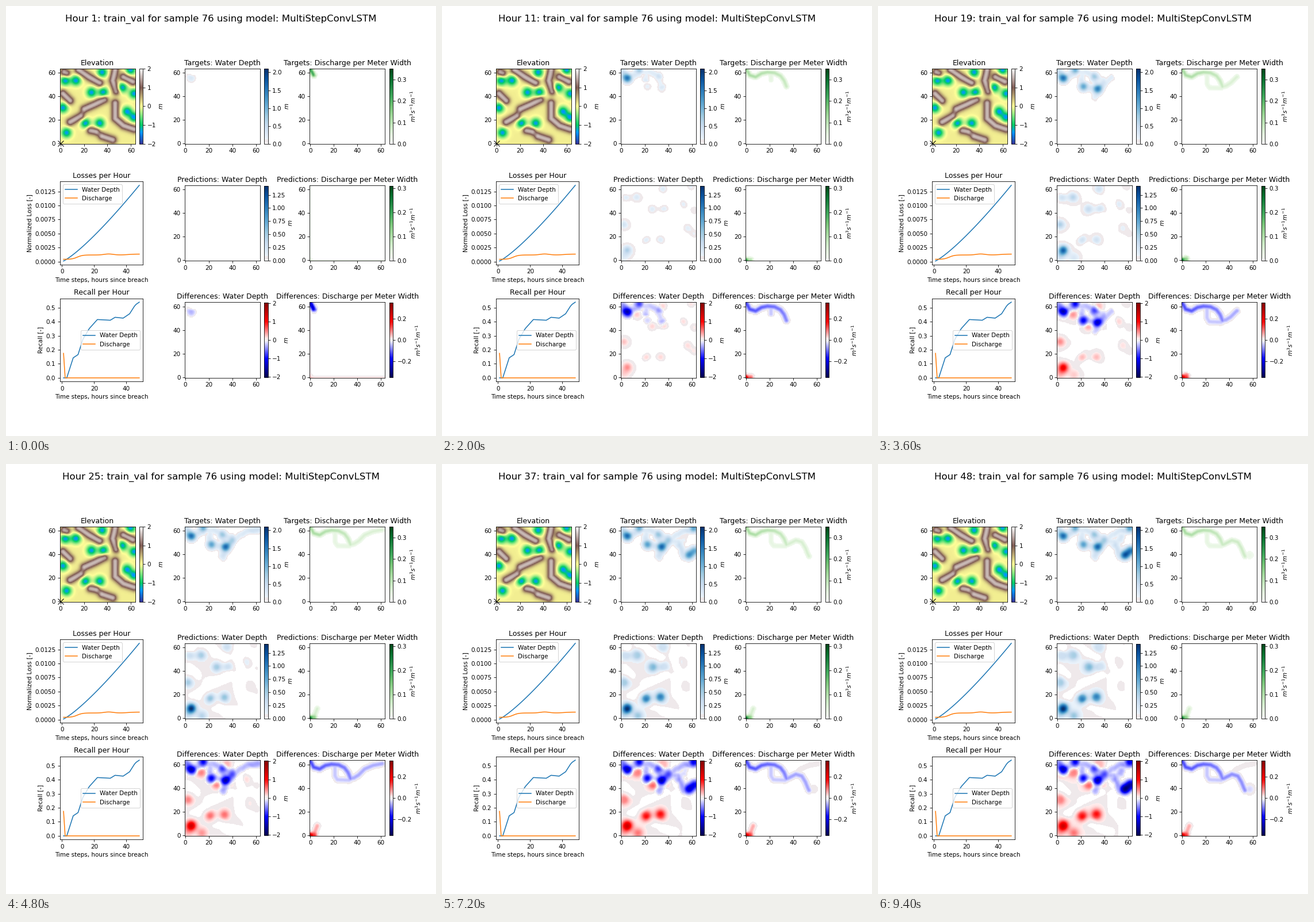
These frames come from a looping animation (748x748 px, 9600 ms). A matplotlib script:

```python
import numpy as np
import matplotlib
import matplotlib.pyplot as plt
from matplotlib.animation import FuncAnimation
from matplotlib.colors import ListedColormap

N = 64
HOURS = np.arange(1, 49)
Y, X = np.mgrid[0:N, 0:N].astype(float)
FLOW_UNIT = "$m^3s^{-1}m^{-1}$"


def ramp(t, start, end):
    return np.clip((t - start) / (end - start), 0, 1)


def sigmoid(v):
    return 1 / (1 + np.exp(-v))


def bump(x, y, size):
    return np.exp(-((X - x) ** 2 + (Y - y) ** 2) / size ** 2)


class Pools:
    """Round pools given as (x, y, peak, arrival hour)."""

    def __init__(self, size, fill_time, *rows):
        self.rows = [(bump(x, y, size), peak, hour)
                     for x, y, peak, hour in rows]
        self.fill_time = fill_time

    def at(self, t):
        return sum(shape * peak * ramp(t, hour, hour + self.fill_time)
                   for shape, peak, hour in self.rows)


class Stream:
    """A winding line that fills from its first point to its last."""

    def __init__(self, *points):
        points = np.array(points, float)
        steps = np.hypot(*np.diff(points, axis=0).T)
        dist = np.r_[0, np.cumsum(steps)] / steps.sum()
        u = np.linspace(0, 1, 120)
        px, py = (np.interp(u, dist, c) for c in points.T)
        d2 = (X[..., None] - px) ** 2 + (Y[..., None] - py) ** 2
        self.along = u[d2.argmin(axis=-1)]
        self.d2 = d2.min(axis=-1)

    def at(self, front, width):
        reached = np.clip((1.1 * front - self.along) * 12, 0, 1)
        return np.exp(-self.d2 / width ** 2) * reached


def tinted(name, white, pale, diverging=False):
    """Colour map whose faintest values fall into a white and a pale band."""
    u = np.linspace(0, 1, 512)
    rgba = matplotlib.colormaps[name](u)
    r = np.abs(2 * u - 1) if diverging else u
    rgba[r < pale] = (0.94, 0.917, 0.925, 1)
    rgba[r < white] = 1
    return ListedColormap(rgba)


# Terrain: ridge lines and round pits
ridges = [Stream(*line) for line in (
    [(15, 62), (24, 56), (33, 51)],
    [(2, 42), (8, 36)],
    [(20, 29), (29, 33), (37, 37)],
    [(46, 62), (44, 53), (47, 44)],
    [(53, 56), (61, 52)],
    [(8, 18), (17, 23)],
    [(35, 6), (44, 3)],
    [(46, 34), (46, 21), (53, 15), (62, 12)],
    [(25, 11), (30, 10)],
    [(3, 60), (5, 59)])]
pits = [(4, 53), (13, 53), (26, 43), (36, 43), (52, 47), (62, 42), (56, 27),
        (62, 22), (33, 17), (5, 9), (21, 17), (2, 30), (59, 62), (35, 60)]
elevation = 0.1 + sum(1.5 * r.at(1, 3.3) for r in ridges)
elevation -= sum(1.5 * bump(x, y, 4.2) for x, y in pits)

target_pools = Pools(
    4.3, 11,
    (5, 55, 1.65, -2), (1, 61, 0.6, -4), (15, 62, 1.3, 2), (31, 56, 0.9, 4),
    (22, 48, 1.2, 8), (34, 46, 1.7, 9), (32, 37, 0.6, 12), (40, 52, 0.8, 13),
    (48, 47, 0.5, 24), (61, 62, 1.2, 22), (54, 54, 0.6, 30),
    (57, 39, 1.8, 29), (62, 43, 1.5, 29))
guess_pools = Pools(
    4.3, 15,
    (5, 8, 1.1, 7), (14, 2, 0.5, 13), (21, 16, 0.7, 19), (33, 18, 0.7, 19),
    (27, 43, 0.35, 16), (14, 53, 0.2, 8), (3, 30, 0.2, 4), (2, 3, 0.25, 2))
guess_flow_pools = Pools(2, 9, (0, 0, 0.22, 0), (4, 0, 0.12, 3))
late_flow = Pools(3.5, 7, (57, 39, 0.03, 35))

main = Stream((0, 63), (3, 57.5), (8, 56), (13, 59), (18, 60), (24, 59.5),
              (29, 57), (32, 53), (34, 48))
spur = Stream((21, 57), (21, 50), (23, 47), (33, 46.5))
east = Stream((34, 48), (37, 48.5), (41, 51), (46, 56), (53, 59), (61, 60.5))
south = Stream((35, 48), (42, 51.5), (47, 50), (50, 45), (52, 40), (53, 38))
spike = Stream((0, 0), (4, 3), (6, 8))
border = np.maximum(np.exp(-Y * 1.6), 0.7 * np.exp(-X * 1.6))


def fronts(t):
    """How far each channel has filled, from 0 to 1."""
    return [(main, 0.2 + 0.8 * ramp(t, 1, 11)), (spur, ramp(t, 8, 19)),
            (east, ramp(t, 12, 25)), (south, ramp(t, 24, 31))]


def target_depth(t):
    wet = np.maximum.reduce([0.45 * s.at(f, 4) for s, f in fronts(t)])
    shore = 0.15 + 0.15 * np.clip(elevation, 0, 1)
    return np.clip(np.maximum(wet * ramp(t, 0, 8), target_pools.at(t))
                   + 0.3 * wet * ramp(t, 5, 30) - shore, 0, None)


def guess_depth(t):
    level = 0.35 - 1.1 * np.exp((11 - t) / 14)
    fill = 0.25 * np.log1p(np.exp((level - elevation) / 0.25))
    reach = 46 + 40 * np.exp(-t / 12)
    base = 0.25 * np.minimum(fill, 1.2) * sigmoid((reach - X) / 4)
    return base * ramp(t, 1, 9) + guess_pools.at(t)


def target_flow(t):
    surge = 1 + 0.8 * np.exp((1 - t) / 2)
    strength = [0.13 * surge * (1 - 0.35 * main.along), 0.04,
                0.06 - 0.05 * ramp(t, 25, 36), 0.05 + 0.03 * ramp(t, 31, 43)]
    flows = [k * s.at(f, 1.9) for k, (s, f) in zip(strength, fronts(t))]
    return np.maximum.reduce([*flows, late_flow.at(t)])


def guess_flow(t):
    return (guess_flow_pools.at(t) + 0.06 * spike.at(ramp(t, 13, 24), 1.9)
            + 0.018 * border * (1 - ramp(t, 1, 4)))


loss_depth = 0.0136 * (HOURS / 48) ** 1.23
loss_flow = 1e-4 * (4.2 + 7.7 * sigmoid((HOURS - 9.5) / 1.6)
                    + 1.8 * np.exp(-((HOURS - 29) / 4) ** 2)
                    + 1.6 * sigmoid((HOURS - 41) / 2))
recall_depth = np.interp(HOURS, *zip(
    (1, 0), (3, 0), (7, 0.143), (10, 0.166), (13, 0.275), (17, 0.352),
    (22, 0.416), (30, 0.411), (33, 0.432), (38, 0.426), (42, 0.457),
    (45.5, 0.52), (48, 0.54)))
recall_flow = np.where(HOURS == 1, 0.175, 0)

fig, axes = plt.subplots(3, 3, figsize=(10, 10), dpi=74.8,
                         gridspec_kw=dict(wspace=0.5))
title = fig.suptitle("", fontsize=16)


def field(ax, name, cmap, low, high, unit):
    im = ax.imshow(np.zeros((N, N)), cmap=cmap, vmin=low, vmax=high,
                   origin="lower")
    ax.set_title(name)
    fig.colorbar(im, ax=ax, fraction=0.045, label=unit)
    return im


def chart(ax, name, ylabel, depth, flow, loc):
    ax.plot(HOURS, depth, label="Water Depth")
    ax.plot(HOURS, flow, label="Discharge")
    ax.set(title=name, xlabel="Time steps, hours since breach", ylabel=ylabel)
    ax.set_box_aspect(1)
    ax.legend(loc=loc)


field(axes[0, 0], "Elevation", "terrain", -2, 2, "$m$").set_data(elevation)
axes[0, 0].plot(0, 0, "kx", markersize=10, clip_on=False,
                scalex=False, scaley=False)
chart(axes[1, 0], "Losses per Hour", "Normalized Loss [-]",
      loss_depth, loss_flow, "upper left")
chart(axes[2, 0], "Recall per Hour", "Recall [-]",
      recall_depth, recall_flow, "center right")

blues = tinted("Blues", 0.015, 0.06)
greens = tinted("Greens", 0.03, 0.03)
seismic = tinted("seismic", 0.006, 0.035, diverging=True)
columns = [("Water Depth", "$m$", blues, (2.1, 1.425, 2.05)),
           ("Discharge per Meter Width", FLOW_UNIT, greens,
            (0.351, 0.31, 0.351))]
images = []
for col, (name, unit, cmap, (top, mid, low)) in enumerate(columns, 1):
    images += [
        field(axes[0, col], f"Targets: {name}", cmap, 0, top, unit),
        field(axes[1, col], f"Predictions: {name}", cmap, 0, mid, unit),
        field(axes[2, col], f"Differences: {name}", seismic, -low, low, unit)]


def update(i):
    t = i + 1
    title.set_text(f"Hour {t}: train_val for sample 76 using model: "
                   "MultiStepConvLSTM")
    depth, depth_guess = target_depth(t), guess_depth(t)
    flow, flow_guess = target_flow(t), guess_flow(t)
    data = [depth, depth_guess, depth_guess - depth,
            flow, flow_guess, flow_guess - flow]
    for im, values in zip(images, data):
        im.set_data(values)
    return [title, *images]


anim = FuncAnimation(fig, update, frames=48, interval=200, repeat=True,
                     repeat_delay=0)
plt.show()
```
